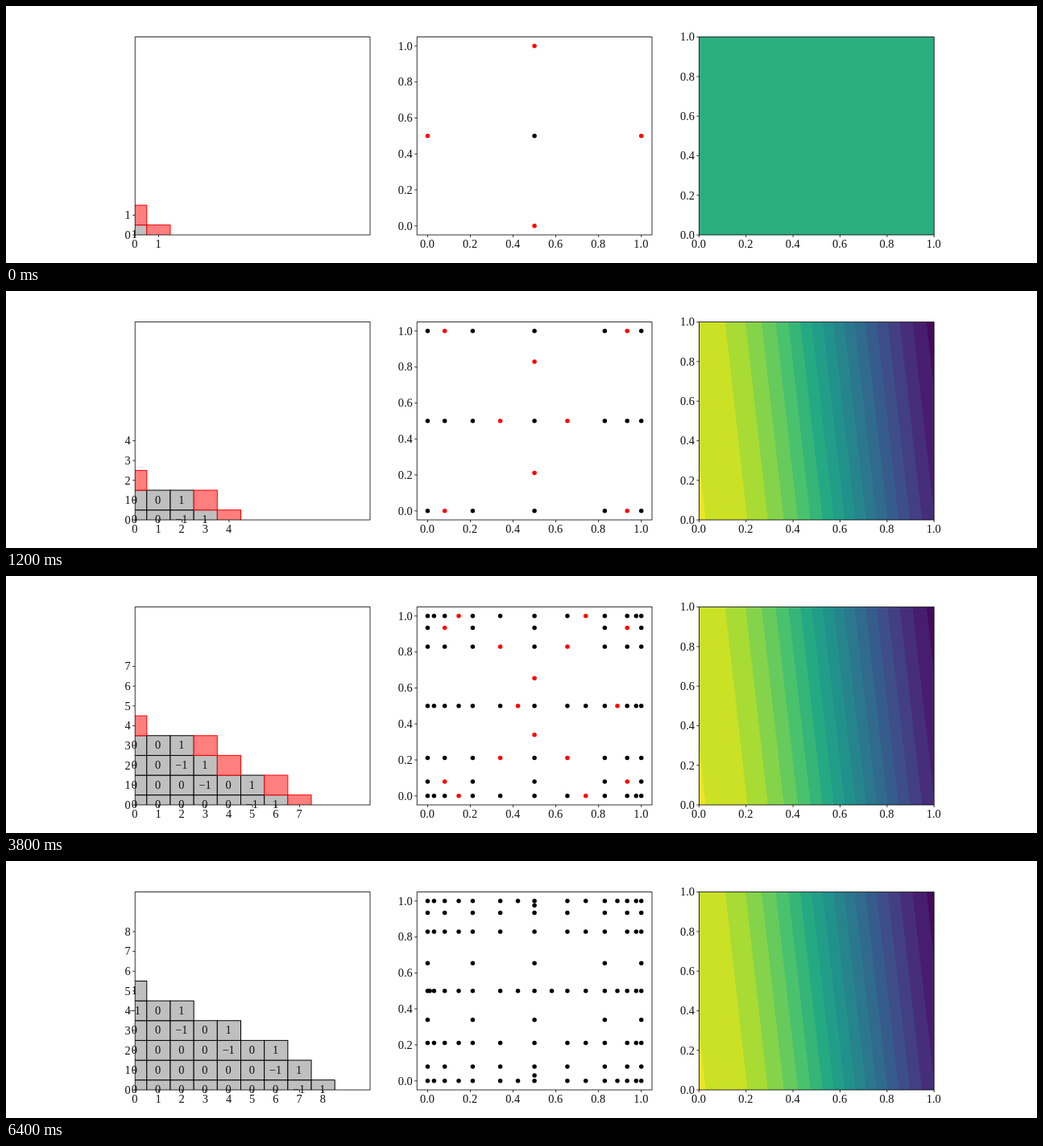
These frames come from a looping animation (1280x320 px, 6600 ms). An HTML page with a canvas:

```html
<!DOCTYPE html>
<html lang="en">
<head>
<meta charset="utf-8">
<title>Adaptive sparse grid</title>
<style>
  html, body { margin: 0; width: 100%; height: 100%; overflow: hidden; background: #fff; }
  canvas { display: block; }
</style>
</head>
<body>
<canvas id="stage" width="1280" height="320"></canvas>
<script>
const ctx = document.getElementById('stage').getContext('2d');
const STEP_MS = 200;
const W = 291.8, H = 246.4, TOP = 38.6, BOTTOM = TOP + H;
const LEFT = { indices: 160.2, points: 510.2, surface: 860.4 };

// Multi-indices [column, row] in the order in which they are accepted.
const ORDER = ('00 10 01 20 11 21 30 31 02 12 40 50 41 22 60 03 13 51 32 23 ' +
  '70 61 42 33 04 52 14 43 71 24 62 80 05').split(' ').map(s => [+s[0], +s[1]]);

// Leja points; level 0 owns the first, every later level owns two more.
const LEJA = [0.5, 0, 1, 0.211, 0.829, 0.08, 0.934, 0.34, 0.654,
  0.03, 0.976, 0.1455, 0.74, 0.4225, 0.888, 0.01, 0.581];
const newPoints = level => level ? LEJA.slice(2 * level - 1, 2 * level + 1) : [LEJA[0]];

// The sampled function is cos(CX x + CY y).
const CX = 2.21, CY = 0.21;

const VIRIDIS = ['440154', '482475', '414487', '355f8d', '2a788e', '21918c',
  '22a884', '44bf70', '7ad151', 'bddf26', 'fde725']
  .map(h => [0, 2, 4].map(i => parseInt(h.slice(i, i + 2), 16)));
const BANDS = 19;
const bandColors = Array.from({ length: BANDS }, (_, i) => {
  const t = (i + 0.5) / BANDS * 10, k = Math.floor(t);
  return VIRIDIS[k].map((c, n) => c + (VIRIDIS[k + 1][n] - c) * (t - k));
});

function interpolate(fn, level, x) {
  const nodes = LEJA.slice(0, 2 * level + 1);
  return nodes.reduce((sum, p, i) => sum + nodes.reduce(
    (term, q, j) => i === j ? term : term * (x - q) / (p - q), fn(p)), 0);
}

// One-dimensional interpolants of cos and sin on the pixel grid, per level.
const COLS = 584, ROWS = 492;
const tabulate = (size, levels, freq, position) =>
  Array.from({ length: levels }, (_, level) => [Math.cos, Math.sin].map(trig =>
    Float64Array.from({ length: size }, (_, i) =>
      interpolate(p => trig(freq * p), level, position((i + 0.5) / size)))));
const alongX = tabulate(COLS, 9, CX, u => u);
const alongY = tabulate(ROWS, 6, CY, u => 1 - u);

const surface = document.createElement('canvas');
surface.width = COLS;
surface.height = ROWS;
const surfaceCtx = surface.getContext('2d');
const image = surfaceCtx.createImageData(COLS, ROWS);

function stateAt(step) {
  const accepted = ORDER.slice(0, step + 1);
  const has = (i, j) => accepted.some(([a, b]) => a === i && b === j);
  const candidates = ORDER.slice(step + 1).filter(([i, j]) =>
    (!i || has(i - 1, j)) && (!j || has(i, j - 1)));
  const coefficients = accepted.map(([i, j]) =>
    1 - has(i + 1, j) - has(i, j + 1) + has(i + 1, j + 1));
  return { accepted, candidates, coefficients };
}

function text(label, x, y, align = 'center') {
  ctx.font = '14.4px "Liberation Serif", serif';
  ctx.textAlign = align;
  ctx.fillStyle = '#111';
  ctx.fillText(label, x, y);
}

function line(x1, y1, x2, y2) {
  ctx.beginPath();
  ctx.moveTo(x1, y1);
  ctx.lineTo(x2, y2);
  ctx.stroke();
}

function frame(left) {
  ctx.strokeStyle = '#000';
  ctx.lineWidth = 0.8;
  ctx.strokeRect(left, TOP, W, H);
}

function ticks(left, labels, xAt, yAt) {
  ctx.strokeStyle = '#000';
  ctx.lineWidth = 0.8;
  for (const label of labels) {
    const x = xAt(+label), y = yAt(+label);
    line(x, BOTTOM, x, BOTTOM + 3);
    line(left - 3, y, left, y);
    text(label, x - 0.4, 300.5);
    text(label, left - 5.4, y + 4.8, 'right');
  }
}

const FRACTIONS = [0, 0.2, 0.4, 0.6, 0.8, 1].map(v => v.toFixed(1));

function drawIndices({ accepted, candidates, coefficients }) {
  const left = LEFT.indices;
  const xAt = i => left + i * W / 10, yAt = j => BOTTOM - j * H / 10;
  const cells = (list, fill, edge) => list.forEach(([i, j]) => {
    const box = [xAt(i - 0.5), yAt(j + 0.5), W / 10, H / 10];
    ctx.fillStyle = fill;
    ctx.strokeStyle = edge;
    ctx.fillRect(...box);
    ctx.strokeRect(...box);
  });
  ctx.save();
  ctx.beginPath();
  ctx.rect(left, TOP, W, H);
  ctx.clip();
  ctx.lineWidth = 1;
  cells(accepted, '#bfbfbf', '#000');
  cells(candidates, '#ff7f7f', '#f00');
  ctx.restore();
  frame(left);
  const last = Math.max(...accepted.concat(candidates).flat());
  ticks(left, Array.from({ length: last + 1 }, (_, i) => String(i)), xAt, yAt);
  accepted.forEach(([i, j], n) =>
    text(String(coefficients[n]).replace('-', '\u2212'), xAt(i) - 0.8, yAt(j) + 4.3));
}

function drawPoints({ accepted, candidates }) {
  const left = LEFT.points;
  const xAt = x => left + (x + 0.05) / 1.1 * W;
  const yAt = y => BOTTOM - (y + 0.05) / 1.1 * H;
  const dots = (list, color) => {
    ctx.fillStyle = color;
    for (const [i, j] of list)
      for (const x of newPoints(i))
        for (const y of newPoints(j)) {
          ctx.beginPath();
          ctx.arc(xAt(x), yAt(y), 2.75, 0, 2 * Math.PI);
          ctx.fill();
        }
  };
  dots(accepted, '#000');
  dots(candidates, '#f00');
  frame(left);
  ticks(left, FRACTIONS, xAt, yAt);
}

function paintSurface({ accepted, coefficients }) {
  const terms = accepted.map(([i, j], n) => [coefficients[n], alongX[i], alongY[j]])
    .filter(([c]) => c);
  for (let row = 0, at = 0; row < ROWS; row++)
    for (let col = 0; col < COLS; col++, at += 4) {
      let value = 0;
      for (const [c, [cosX, sinX], [cosY, sinY]] of terms)
        value += c * (cosX[col] * cosY[row] - sinX[col] * sinY[row]);
      const band = Math.floor((value + 0.802) * 10);
      const color = bandColors[Math.max(0, Math.min(BANDS - 1, band))];
      image.data[at] = color[0];
      image.data[at + 1] = color[1];
      image.data[at + 2] = color[2];
      image.data[at + 3] = 255;
    }
  surfaceCtx.putImageData(image, 0, 0);
}

function drawSurface(state) {
  const left = LEFT.surface;
  if (state.accepted.length === 1) {
    ctx.fillStyle = '#2aae80';
    ctx.fillRect(left, TOP, W, H);
  } else {
    paintSurface(state);
    ctx.drawImage(surface, left, TOP, W, H);
  }
  frame(left);
  ticks(left, FRACTIONS, x => left + x * W, y => BOTTOM - y * H);
}

let shown = -1;
function render() {
  const step = Math.floor(performance.now() / STEP_MS) % ORDER.length;
  if (step !== shown) {
    shown = step;
    const state = stateAt(step);
    ctx.fillStyle = '#fff';
    ctx.fillRect(0, 0, 1280, 320);
    drawIndices(state);
    drawPoints(state);
    drawSurface(state);
  }
  requestAnimationFrame(render);
}
render();
</script>
</body>
</html>
```
